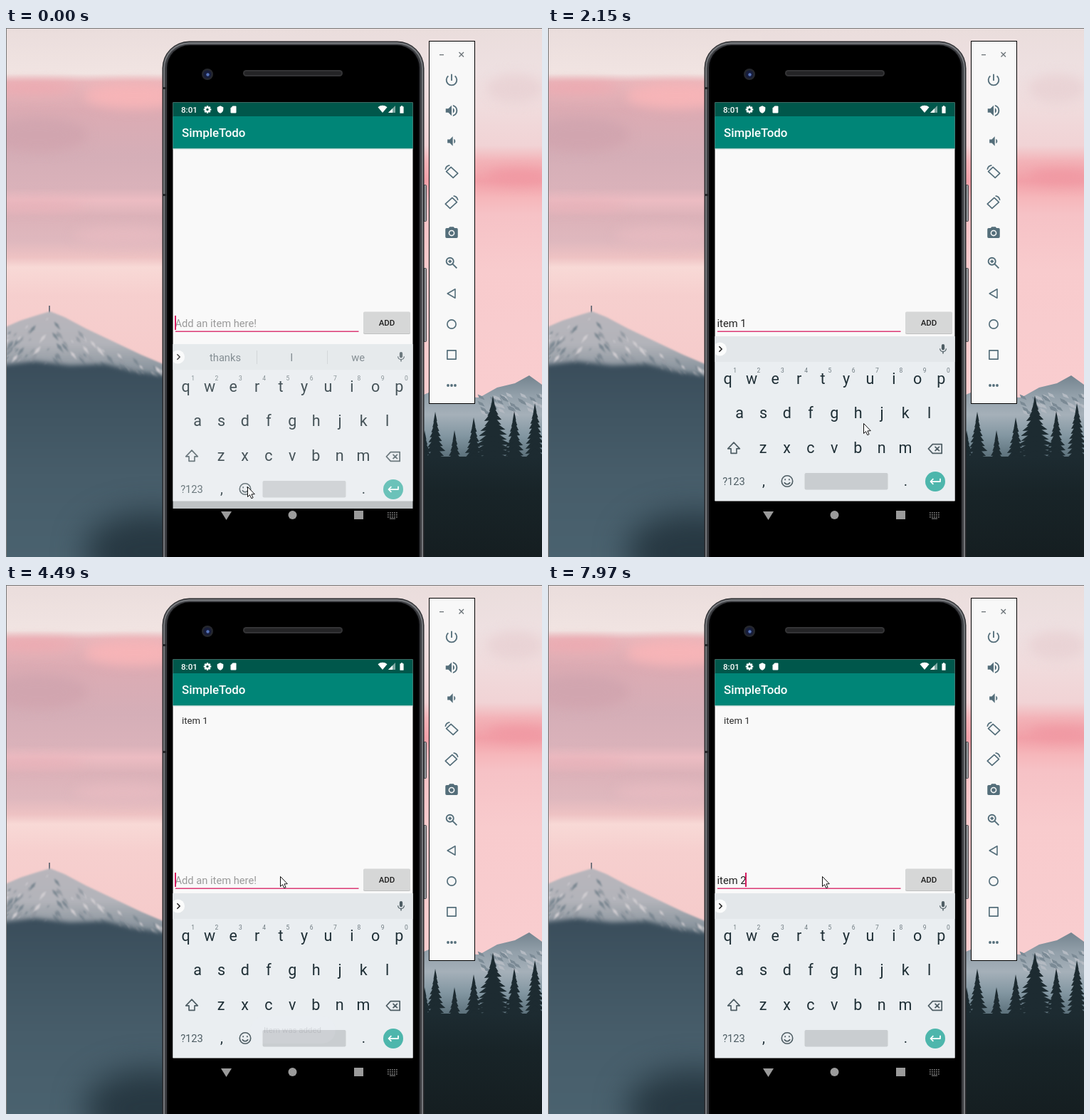
An HTML page with a canvas for the animation above (8000 ms loop, 753 by 743 pixels).

```html
<!DOCTYPE html>
<html lang="en">
<head>
<meta charset="utf-8">
<title>Todo app demo</title>
<style>
html, body { margin: 0; width: 100%; height: 100%; overflow: hidden; background: #000; }
canvas { display: block; }
</style>
</head>
<body>
<canvas id="stage" width="753" height="743"></canvas>
<script>
const W = 753, H = 743, LOOP = 8000;
const stage = document.getElementById('stage').getContext('2d');
let g = stage;

// Each step overrides part of the state from its time on.
const steps = [
  [0, { text: '', caret: 1, words: 'thanks,I,we', tip: [339, 644], slide: 11, press: 0, listed: 0, toast: 0, plate: 0 }],
  [150, { text: 'i', slide: 0 }],
  [320, { text: 'ite', words: "it's,it,is" }],
  [460, { text: 'item', words: 'ite,*item,it' }],
  [580, { words: 'item,items,itemized' }],
  [1140, { caret: 0 }],
  [1290, { text: 'item ', caret: 1 }],
  [1440, { text: 'item 1' }],
  [1570, { words: '' }],
  [2000, { caret: 0, tip: [401, 595] }],
  [2150, { tip: [443, 555] }],
  [2300, { tip: [474, 504] }],
  [2420, { tip: [508, 455] }],
  [2550, { tip: [531, 426], caret: 1 }],
  [2670, { tip: [538, 417] }],
  [2820, { tip: [536, 414] }],
  [3070, { caret: 0 }],
  [3370, { press: 0.1 }],
  [3520, { press: 0.07, text: '', caret: 1 }],
  [3640, { press: 0.03, tip: [455, 433] }],
  [3760, { press: 0, tip: [387, 408] }],
  [3910, { tip: [385, 409] }],
  [4490, { listed: 1, toast: 0.12, plate: 0.1 }],
  [4620, { toast: 0.4, plate: 0.3 }],
  [4770, { toast: 0.7, plate: 0.6 }],
  [4900, { toast: 0.95, plate: 0.9 }],
  [5200, { words: 'thanks,I,we', caret: 0 }],
  [5630, { text: 'i', caret: 1 }],
  [5760, { words: "in,I,I'm", toast: 0.7 }],
  [5910, { toast: 0.25, plate: 0.4 }],
  [6040, { toast: 0, plate: 0, caret: 0 }],
  [6320, { text: 'it', words: "it's,it,is", caret: 1 }],
  [6600, { text: 'ite' }],
  [6770, { text: 'item' }],
  [6890, { words: 'ite,*item,it' }],
  [7010, { words: 'item,items,itemized' }],
  [7290, { text: 'item ', words: '1,and,is' }],
  [7720, { text: 'item 2' }],
  [7850, { words: '' }]
];

// Icon outlines on a 24 unit grid.
const shapes = {
  power: 'M13 3h-2v10h2V3zm4.8 2.2l-1.4 1.4A7 7 0 1 1 7.6 6.6L6.2 5.2A9 9 0 1 0 17.8 5.2z',
  loud: 'M3 9v6h4l5 5V4L7 9zM14 8a4.5 4.5 0 0 1 0 8zM14 3.2v2.1a7 7 0 0 1 0 13.4v2.1a9 9 0 0 0 0-17.6z',
  quiet: 'M5 9v6h4l5 5V4L9 9zM16 8a4.5 4.5 0 0 1 0 8z',
  camera: 'M9 2L7.2 4H4a2 2 0 0 0-2 2v12a2 2 0 0 0 2 2h16a2 2 0 0 0 2-2V6a2 2 0 0 0-2-2h-3.2L15 2zM12 17a5 5 0 1 1 0-10 5 5 0 0 1 0 10zM12 8.8a3.2 3.2 0 1 0 0 6.4 3.2 3.2 0 0 0 0-6.4z',
  zoom: 'M9.5 4a5.5 5.5 0 1 0 0 11 5.5 5.5 0 0 0 0-11zM14 14l6 6M9.5 7v5M7 9.5h5',
  turn: 'M11 4.5L22 14.5 14.5 21.500 3.500 11.500zM2 8.500C2.500 4.500 5 2 9 1.500',
  back: 'M18 4.5v15L5 12z',
  home: 'M12 5a7 7 0 1 0 0 14 7 7 0 0 0 0-14z',
  recent: 'M5 5h14v14H5z',
  mic: 'M12 14a3 3 0 0 0 3-3V5a3 3 0 0 0-6 0v6a3 3 0 0 0 3 3zm5.3-3a5.3 5.1 0 0 1-10.6 0H5a7 7 0 0 0 6 6.7V21h2v-3.3a7 7 0 0 0 6-6.7z',
  shield: 'M12 1L3 5v6c0 5.6 3.8 10.7 9 12 5.2-1.3 9-6.4 9-12V5z',
  card: 'M18 2h-8L4 8v12a2 2 0 0 0 2 2h12a2 2 0 0 0 2-2V4a2 2 0 0 0-2-2z',
  wifi: 'M12 21L0 7a18 18 0 0 1 24 0z',
  battery: 'M16 4h-2V2h-4v2H8a1 1 0 0 0-1 1v16a1 1 0 0 0 1 1h8a1 1 0 0 0 1-1V5a1 1 0 0 0-1-1z',
  shift: 'M12 3L2.5 13H7.5V20.5H16.5V13H21.5z',
  erase: 'M8 5h14v14H8L1.5 12zM11.5 8.5l7 7M18.5 8.5l-7 7',
  smile: 'M12 2.5a9.5 9.5 0 1 0 0 19 9.5 9.5 0 0 0 0-19zM7 14a5.5 5.5 0 0 0 10 0M8.5 8v2.500M15.5 8v2.500',
  enter: 'M20 7v5H5M9 7.5L4.5 12 9 16.5',
  chevron: 'M9 5l7 7-7 7'
};
for (const k in shapes) shapes[k] = new Path2D(shapes[k]);

function icon(name, x, y, size, color, line = 0, flip = 1) {
  g.save();
  g.translate(x, y);
  g.scale(flip * size / 24, size / 24);
  g.translate(-12, -12);
  g.fillStyle = g.strokeStyle = color;
  g.lineWidth = line;
  g.lineJoin = 'round';
  if (line) g.stroke(shapes[name]); else g.fill(shapes[name], 'evenodd');
  g.restore();
}
function rect(x, y, w, h, color) { g.fillStyle = color; g.fillRect(x, y, w, h); }
function round(x, y, w, h, r, color) {
  g.fillStyle = color; g.beginPath(); g.roundRect(x, y, w, h, r); g.fill();
}
function disc(x, y, r, color, ry = r) {
  g.fillStyle = color; g.beginPath(); g.ellipse(x, y, r, ry, 0, 0, 7); g.fill();
}
function poly(pts, color) {
  g.fillStyle = color; g.beginPath();
  for (let i = 0; i < pts.length; i += 2) g.lineTo(pts[i], pts[i + 1]);
  g.closePath(); g.fill();
}
function label(s, x, y, size, color, weight = 400, align = 'left') {
  g.font = `${weight} ${size}px Roboto, sans-serif`;
  g.textAlign = align; g.fillStyle = color; g.fillText(s, x, y);
}
function fade(x0, y0, x1, y1, stops) {
  const f = g.createLinearGradient(x0, y0, x1, y1), len = Math.hypot(x1 - x0, y1 - y0);
  for (const [at, c] of stops) f.addColorStop(at / len, c);
  return f;
}
function random(seed) {
  return () => (seed = seed * 16807 % 2147483647) / 2147483647;
}

function drawSky() {
  rect(0, 0, 300, H, fade(0, 0, 0, 500, [[0, '#eadddc'], [64, '#f1e4e2'], [76, '#e9b6bb'], [115, '#dcabb3'],
    [180, '#d5aeb7'], [225, '#dab2ba'], [242, '#ecbcc2'], [264, '#dcb2b9'], [300, '#dfb8be'],
    [322, '#eec2c3'], [336, '#f8d9d6'], [375, '#f6cfce'], [500, '#f5caca']]));
  rect(300, 0, 453, H, fade(0, 0, 0, 500, [[0, '#eadddc'], [60, '#eee0e1'], [110, '#f0dcdd'], [165, '#f1d3d5'],
    [187, '#f3b3b8'], [215, '#f2a0a8'], [238, '#f6b6ba'], [262, '#f6c2c6'], [340, '#f8cbcd'], [500, '#f9cdcf']]));
  g.filter = 'blur(8px)';
  disc(180, 95, 70, '#f6b4b7', 18);
  disc(40, 84, 60, '#eda9b0', 8);
  disc(45, 150, 70, '#d1a5af', 24);
  disc(40, 250, 70, '#e8b0b8', 6);
  disc(165, 292, 70, '#e6bac0', 12);
  disc(715, 85, 40, '#e9d3d5', 20);
  disc(720, 208, 45, '#f098a2', 10);
  g.filter = 'none';
}

function drawHills() {
  const rnd = random(41);
  const ridge = x => x < 62 ? 421 - x * 0.35 : 400 + (x - 62) * 0.47;
  rect(60, 390, 2, 14, '#75757e');
  g.filter = 'blur(0.8px)';
  poly([-3, 421, 20, 411, 45, 403, 62, 398, 82, 406, 112, 422, 150, 440, 190, 459, 230, 476, 230, 510, -3, 500],
    fade(0, 398, 0, 490, [[0, '#b9b6bc'], [45, '#b3b4ba'], [92, '#7f8c96']]));
  for (let i = 0; i < 150; i++) {
    const x = rnd() * 220, y = ridge(x) + 5 + rnd() * 65, s = 2 + rnd() * 5;
    const lean = x < 62 ? -1 : 1;
    poly([x, y, x + s * lean, y + s * 0.7, x + s * 1.6 * lean, y + s * 2.2, x + s * 0.3 * lean, y + s],
      ['#7c8892', '#959ba3', '#cfccd0'][i % 3]);
  }
  g.filter = 'blur(3px)';
  poly([-9, 474, 40, 468, 90, 474, 140, 472, 180, 482, 235, 490, 235, 755, -9, 755],
    fade(0, 470, 0, 743, [[0, '#3a4d5b'], [70, '#405562'], [160, '#475d6a'], [273, '#4a626f']]));
  g.filter = 'blur(22px)';
  disc(205, 735, 95, '#273842', 55);
  g.filter = 'none';

  poly([580, 518, 608, 506, 640, 518, 665, 519, 690, 505, 715, 499, 735, 488, 753, 501, 753, 640, 580, 640],
    fade(0, 488, 0, 620, [[0, '#74848f'], [28, '#93a0aa'], [55, '#a5b0b9'], [85, '#8296a1'], [130, '#485d67']]));
  for (let i = 0; i < 35; i++) {
    const x = 660 + rnd() * 93, y = 509 + rnd() * 30;
    poly([x, y, x + 7, y + 3, x + 10, y + 8, x + 2, y + 5], i % 2 ? '#b4bac2' : '#7b8a95');
  }
  const tree = (x, top, wide) => {
    for (let y = top; y < 640; y += 7) {
      const w = 2.5 + wide * Math.min(1, (y - top) / 75) * (0.75 + rnd() * 0.4);
      poly([x, y - 7, x + w, y + 6, x - w, y + 8], '#1d2b31');
    }
  };
  [[588, 572], [603, 546], [630, 572], [657, 554], [684, 523], [714, 545], [743, 534]]
    .forEach(([x, top], i) => tree(x, top, i === 4 ? 30 : 19));
  rect(580, 602, 173, 141, fade(0, 602, 0, 743, [[0, '#1d2b31'], [50, '#182428'], [141, '#151e21']]));
}

function drawPhone() {
  for (const [y, h] of [[220, 52], [337, 104]]) {
    round(584, y, 7, h, 2, '#47494d');
    rect(588, y + 1, 2, h - 2, '#9a9ca0');
  }
  round(219.500, 18.500, 368, 800, 38, '#2a2b2e');
  round(221, 20, 365, 800, 36, '#75777b');
  round(223, 22.500, 361, 800, 34, '#3c3d41');
  round(226, 24, 355, 800, 32, '#08080a');
  round(228, 25, 351, 800, 30, '#000');
  for (const y of [83, 233]) rect(220, y, 5, 3, '#222326');
  disc(283, 65, 8, '#25272d');
  disc(283, 65, 5.5, '#171d3b');
  disc(283.5, 65.5, 2.2, '#5774ba');
  round(333, 59, 140, 9, 4.5, '#343436');
  round(335, 61, 136, 5, 2.5, '#242426');

  const nav = '#9b9b9b';
  poly([302, 679, 317, 679, 309.5, 691], nav);
  disc(402.5, 684, 6, nav);
  rect(489, 678, 13, 12, nav);
  for (let i = 0; i < 15; i++) rect(536 + i % 5 * 3, 680 + (i / 5 | 0) * 3, 1.700, 1.700, '#757575');
  rect(539, 688.500, 8, 1.3, '#757575');
}

function drawPanel() {
  rect(594, 18, 65, 510, '#000');
  rect(595, 19, 63, 508, '#f8f8f8');
  const c = '#546e7a';
  rect(609, 37, 6, 1.3, '#6d7479');
  g.strokeStyle = '#6d7479'; g.lineWidth = 1.4;
  g.beginPath(); g.moveTo(636.5, 34); g.lineTo(643, 40.5); g.moveTo(643, 34); g.lineTo(636.5, 40.5); g.stroke();
  icon('power', 626, 73, 22, c);
  icon('loud', 626, 116, 22, c);
  icon('quiet', 626, 159, 20, c);
  icon('turn', 626, 202, 21, c, 1.9);
  icon('turn', 626, 245, 21, c, 1.9, -1);
  icon('camera', 626, 288, 21, c);
  icon('zoom', 626, 330, 22, c, 2.1);
  icon('back', 626, 373, 20, c, 1.9);
  icon('home', 626, 416, 21, c, 1.9);
  icon('recent', 626, 459, 21, c, 1.9);
  for (const x of [621, 626, 631]) disc(x, 502, 1.9, c);
}

function drawApp() {
  rect(234.5, 104.5, 337, 560, '#f9f9f9');
  rect(234.5, 104.5, 337, 20, '#00574b');
  rect(234.5, 124, 337, 45.500, '#008577');
  rect(234.5, 169.500, 337, 1, '#cfdcda');
  label('8:01', 246, 119, 11.6, '#fff', 500);
  label('SimpleTodo', 247, 153, 16.9, '#fff', 500);
  g.save();
  g.translate(283, 114.5);
  for (let i = 0; i < 4; i++) { g.rotate(Math.PI / 4); rect(-1.2, -5.3, 2.4, 10.6, '#fff'); }
  disc(0, 0, 4, '#fff');
  disc(0, 0, 1.7, '#00574b');
  g.restore();
  icon('shield', 301, 114.5, 11.5, '#fff');
  icon('card', 319.5, 114.5, 12, '#fff');
  icon('wifi', 529, 114, 13, '#fff');
  poly([537, 119, 547, 109, 547, 119], '#7fa9a3');
  poly([537, 119, 543, 113, 543, 119], '#fff');
  icon('battery', 556, 114.5, 12.5, '#fff');
}

function drawKeys() {
  const ink = '#1f2f36', soft = '#4e5d64';
  rect(234.5, 433, 337, 231, '#eaeef1');
  rect(234.5, 433, 337, 36, '#e3e7ea');
  g.save();
  g.beginPath(); g.rect(235, 433, 336, 36); g.clip();
  disc(241.5, 451, 9.5, '#fbfcfc');
  g.restore();
  icon('chevron', 242, 451, 13, '#222', 3);
  icon('mic', 555, 451, 17, soft);
  [['qwertyuiop', 252.7, 500], ['asdfghjkl', 269.2, 548], ['zxcvbnm', 302.2, 597]].forEach(([row, x, y], r) => {
    [...row].forEach((ch, i) => {
      label(ch, x + i * 33.3, y, 21.5, ink, 400, 'center');
      if (!r) label((i + 1) % 10, x + 10 + i * 33.3, 484, 8.5, '#6f7b81', 400, 'center');
    });
  });
  icon('shift', 261, 590, 21, soft, 1.9);
  icon('erase', 544, 591, 22, soft, 1.9);
  label('?123', 261, 642, 14.7, soft, 400, 'center');
  label(',', 303, 643, 20, ink, 400, 'center');
  label('.', 502.5, 643, 20, ink, 400, 'center');
  icon('smile', 336, 636.5, 19.5, soft, 2);
  round(360.5, 625, 117, 23.5, 2, '#c9cdd0');
  disc(544, 637, 14, '#4db6ac');
  icon('enter', 544, 637, 21, '#fff', 2);
}

function drawWords(words) {
  if (!words) return;
  for (const x of [352, 451]) rect(x, 442, 1, 19, '#cbd0d3');
  words.split(',').forEach((w, i) => {
    const bold = w[0] === '*';
    label(bold ? w.slice(1) : w, 308 + i * 93.3, 457, 14.7, bold ? '#0c0c0c' : '#6b777d', bold ? 700 : 400, 'center');
  });
}

function drawField(s) {
  if (s.listed) label('item 1', 247, 195, 13.1, '#2b2b2b');
  label(s.text || 'Add an item here!', 237.5, 420, 14.7, s.text ? '#222' : '#9a9a9a');
  const w = s.text ? g.measureText(s.text).width : 0;
  if (s.text && !s.text.includes(' ')) rect(237.5, 421, w, 1, '#333');
  rect(238, 425.5, 257.5, 1.5, '#dc3975');
  if (s.caret) rect(Math.floor(237 + w), 404, 2, 20, '#d81b60');

  round(502, 400, 66, 30, 2, '#bfc0c0');
  round(502, 398.5, 66, 30.5, 2, '#d6d7d7');
  if (s.press) round(502, 398.5, 66, 30.5, 2, `rgba(0,0,0,${s.press})`);
  label('ADD', 535, 418, 11.5, '#202020', 500, 'center');
}

function drawToast(s) {
  g.globalAlpha = s.plate;
  round(343, 606, 120, 38, 19, '#eaedef');
  g.globalAlpha = s.toast;
  label('Item was added', 402.5, 629, 11.45, '#414547', 400, 'center');
  g.globalAlpha = 1;
}

function drawPointer([x, y]) {
  g.save();
  g.translate(x + 0.5, y + 0.5);
  poly([0, 0, 0, 14, 3, 11.2, 5.3, 16.2, 7.6, 15.2, 5.4, 10.4, 9.8, 10.2], '#fff');
  g.strokeStyle = '#111'; g.lineWidth = 1; g.stroke();
  g.restore();
}

function layer(...parts) {
  const c = document.createElement('canvas');
  c.width = W; c.height = H;
  g = c.getContext('2d');
  parts.forEach(p => p());
  g = stage;
  return c;
}

const scene = layer(drawSky, drawHills, drawPhone, drawPanel, drawApp,
  () => { rect(0, 0, W, 1, '#777'); rect(0, 0, 1, H, '#777'); });
const keys = layer(drawKeys);
const risingKeys = layer(drawKeys, () => drawWords('thanks,I,we'));

function draw(t) {
  const s = {};
  for (const [at, change] of steps) if (at <= t) Object.assign(s, change);
  g.drawImage(scene, 0, 0);
  drawField(s);
  if (s.slide) {
    g.globalAlpha = 0.82;
    g.drawImage(risingKeys, 0, s.slide);
    g.globalAlpha = 1;
  } else {
    g.drawImage(keys, 0, 0);
    drawWords(s.words);
  }
  drawToast(s);
  drawPointer(s.tip);
}

const start = performance.now();
function tick() {
  draw((performance.now() - start) % LOOP);
  requestAnimationFrame(tick);
}
tick();
</script>
</body>
</html>
```
